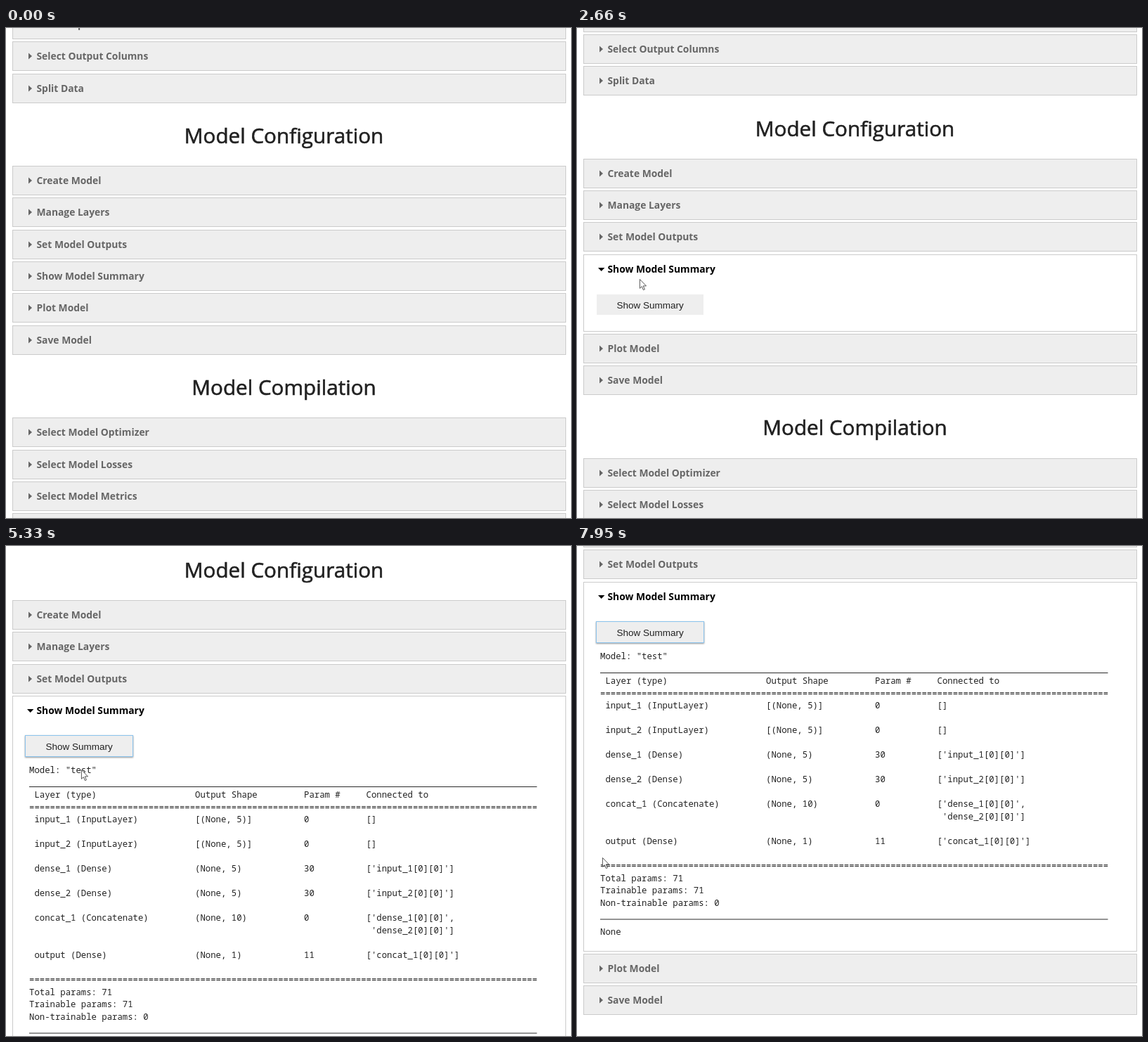
An HTML page that plays this animation: 804x697 px, repeating every 8000 ms.

```html
<!DOCTYPE html>
<html lang="en">
<head>
<meta charset="utf-8">
<title>Model summary panel</title>
<style>
  html, body { margin: 0; width: 100%; height: 100%; overflow: hidden; background: #fff; }
  svg { display: block; }
  .heading { font: 400 29.65px "Open Sans", "Noto Sans", sans-serif; fill: #212121; stroke: #212121; stroke-width: .6px; text-anchor: middle; }
  .row .box { fill: #eee; stroke: #cbcbcb; }
  .row .label { font: 700 13.85px "Open Sans", "Noto Sans", sans-serif; }
  .row .label, .row .caret { fill: #666; }
  .row.hover .box, .row.open .box { fill: #fff; }
  .row.hover .label, .row.hover .caret { fill: #161616; }
  .row.open .label, .row.open .caret { fill: #000; }
  .panel, .output { visibility: hidden; }
  .open .panel, .done .output { visibility: visible; }
  .button .face { fill: #eee; }
  .button .ring { fill: none; }
  .button text { font: 13.5px "Liberation Sans", Arial, sans-serif; fill: #212121; }
  .raised .button { filter: drop-shadow(0 1px 1.2px rgba(0, 0, 0, .42)); }
  .pressed .button { filter: drop-shadow(0 3px 3px rgba(0, 0, 0, .42)); }
  .focus .button .ring { stroke: #8cc4ee; }
  .output text { font: 12.3px "Noto Sans Mono", "DejaVu Sans Mono", monospace; fill: #222; white-space: pre; }
  .output path { stroke: #2a2a2a; stroke-width: 1.2; }
  .cursor { fill: #fff; stroke: #444; stroke-width: .9; stroke-linejoin: round; }
</style>
</head>
<body>
<svg id="stage" width="804" height="697" viewBox="0 0 804 697"></svg>
<script>
const LOOP = 8000, STEP = 70;
const PITCH = 45.33, ROW_HEIGHT = 41, LINE = 17.53;
const ENTER = 130, OPEN_ROW = 2000, HOVER_BUTTON = 3300, CLICK_BUTTON = 4470, SHOW_OUTPUT = 4530;
const OPEN_GROWTH = 67.7, OUTPUT_GROWTH = 484;
const CARET_RIGHT = 'M32 16.5 L37 21 L32 25.5 Z';
const CARET_DOWN = 'M30 19 H39.4 L34.7 24 Z';

const stage = document.getElementById('stage');

function add(parent, tag, attrs = {}, text) {
  const node = document.createElementNS('http://www.w3.org/2000/svg', tag);
  for (const key in attrs) node.setAttribute(key, attrs[key]);
  if (text !== undefined) node.textContent = text;
  parent.appendChild(node);
  return node;
}

// Page content, placed in unscrolled page coordinates
const blocks = [];
let summary = null;

function addHeading(y, text) {
  const group = add(stage, 'g');
  add(group, 'text', { class: 'heading', x: 395.5, y: 0 }, text);
  blocks.push({ group, y, below: !!summary });
}

function addRows(top, labels) {
  labels.forEach((label, i) => {
    const group = add(stage, 'g', { class: 'row' });
    const box = add(group, 'rect', { class: 'box', x: 9.5, y: .5, width: 787, height: ROW_HEIGHT });
    const caret = add(group, 'path', { class: 'caret', d: CARET_RIGHT });
    add(group, 'text', { class: 'label', x: 43.5, y: 26 }, label);
    const block = { group, box, caret, y: top + i * PITCH, below: !!summary, row: true };
    blocks.push(block);
    if (label === 'Show Model Summary') {
      summary = block;
      addPanel(group);
    }
  });
}

function addPanel(group) {
  const panel = add(group, 'g', { class: 'panel' });
  const button = add(panel, 'g', { class: 'button' });
  add(button, 'rect', { class: 'face', x: 28, y: 57, width: 152, height: 29 });
  add(button, 'rect', { class: 'ring', x: 27.5, y: 56.5, width: 153, height: 30 });
  add(button, 'text', { x: 56.5, y: 76.5 }, 'Show Summary');

  const cells = (a, b, c, d) => (' ' + a).padEnd(32) + b.padEnd(21) + c.padEnd(12) + d;
  const rule = '='.repeat(98);
  const lines = [
    'Model: "test"', '',
    cells('Layer (type)', 'Output Shape', 'Param #', 'Connected to'),
    rule,
    cells('input_1 (InputLayer)', '[(None, 5)]', '0', '[]'), '',
    cells('input_2 (InputLayer)', '[(None, 5)]', '0', '[]'), '',
    cells('dense_1 (Dense)', '(None, 5)', '30', "['input_1[0][0]']"), '',
    cells('dense_2 (Dense)', '(None, 5)', '30', "['input_2[0][0]']"), '',
    cells('concat_1 (Concatenate)', '(None, 10)', '0', "['dense_1[0][0]',"),
    cells('', '', '', " 'dense_2[0][0]']"), '',
    cells('output (Dense)', '(None, 1)', '11', "['concat_1[0][0]']"), '',
    rule,
    'Total params: 71', 'Trainable params: 71', 'Non-trainable params: 0'
  ];
  const output = add(panel, 'g', { class: 'output' });
  lines.forEach((line, i) => {
    if (line) add(output, 'text', { x: 33, y: 110 + i * LINE }, line);
  });
  add(output, 'path', { d: 'M33 129.5 H755.5 M33 480 H755.5' });
  add(output, 'text', { x: 33, y: 502 }, 'None');
}

addRows(-26, ['Select Input Columns', 'Select Output Columns', 'Split Data']);
addHeading(164, 'Model Configuration');
addRows(196, ['Create Model', 'Manage Layers', 'Set Model Outputs', 'Show Model Summary', 'Plot Model', 'Save Model']);
addHeading(522, 'Model Compilation');
addRows(554.4, ['Select Model Optimizer', 'Select Model Losses', 'Select Model Metrics', 'Compile Model']);

const cursor = add(stage, 'path', {
  class: 'cursor',
  d: 'M.4 .5 V13.3 L3.3 10.6 L5.4 15.6 L7.4 14.8 L5.3 9.9 H9.5 Z'
});

// Motion advances in discrete steps, counted from the start of each move
const elapsed = (t, start) => Math.floor((t - start) / STEP) * STEP;
const clamp = u => Math.min(1, Math.max(0, u));

// Three equal wheel turns; lead is the time already run when each first shows
const WHEEL = 93.8, WHEEL_TIME = 210;
const wheels = [{ at: 2660, lead: 45 }, { at: 5330, lead: 73 }, { at: 5930, lead: 58 }];

function scrollAt(t) {
  let sum = 0;
  for (const { at, lead } of wheels) {
    if (t < at) break;
    const u = clamp((elapsed(t, at) + lead) / WHEEL_TIME);
    sum += WHEEL * (1 - Math.cos(Math.PI * u)) / 2;
  }
  return sum;
}

// Pointer strokes: quadratic curves, slowing down by the given power
const strokes = [
  { start: 130, end: 900, power: 2, from: [210, 655], bend: [110, 31], to: [104, 175] },
  { start: 900, end: 1530, power: 4, from: [104, 175], bend: [100, 269.5], to: [96, 364] },
  { start: 2460, end: 2600, power: 1, from: [96, 364], bend: [92, 360], to: [89, 357] },
  { start: 2880, end: 4070, power: 1, from: [89, 357], bend: [104, 267], to: [107, 319] },
  { start: 5120, end: 5190, power: 1, from: [107, 319], bend: [107, 318], to: [107, 318] },
  { start: 6340, end: 7180, power: 1, from: [107, 318], bend: [286, 120], to: [50, 212] },
  { start: 7180, end: 7950, power: 1, from: [50, 212], bend: [19, 330], to: [36, 443] }
];

function pointerAt(t) {
  const s = strokes.filter(stroke => stroke.start <= t).pop() || strokes[0];
  const u = clamp(elapsed(t, s.start) / (s.end - s.start));
  const k = 1 - (1 - u) ** s.power;
  return s.from.map((from, i) =>
    (1 - k) ** 2 * from + 2 * k * (1 - k) * s.bend[i] + k * k * s.to[i]);
}

function render(t) {
  const open = t >= OPEN_ROW, done = t >= SHOW_OUTPUT, visible = t >= ENTER;
  const growth = done ? OUTPUT_GROWTH : open ? OPEN_GROWTH : 0;
  const scroll = scrollAt(t);
  const [x, y] = pointerAt(t);
  const hoverY = pointerAt(t - STEP)[1]; // highlight trails by one step

  for (const block of blocks) {
    const top = Math.round(block.y + (block.below ? growth : 0) - scroll);
    block.group.setAttribute('transform', `translate(0 ${top})`);
    if (block.row) {
      const isOpen = block === summary && open;
      const hover = visible && !isOpen && hoverY >= top && hoverY <= top + ROW_HEIGHT;
      block.group.classList.toggle('hover', hover);
    }
  }

  const state = summary.group.classList;
  state.toggle('open', open);
  state.toggle('raised', t >= HOVER_BUTTON);
  state.toggle('pressed', t >= CLICK_BUTTON && !done);
  state.toggle('focus', t >= CLICK_BUTTON);
  state.toggle('done', done);
  summary.box.setAttribute('height', ROW_HEIGHT + Math.round(growth));
  summary.caret.setAttribute('d', open ? CARET_DOWN : CARET_RIGHT);

  cursor.setAttribute('visibility', visible ? 'visible' : 'hidden');
  cursor.setAttribute('transform', `translate(${Math.round(x)} ${Math.round(y)})`);
}

const began = performance.now();
function tick() {
  render((performance.now() - began) % LOOP);
  requestAnimationFrame(tick);
}
tick();
</script>
</body>
</html>
```
